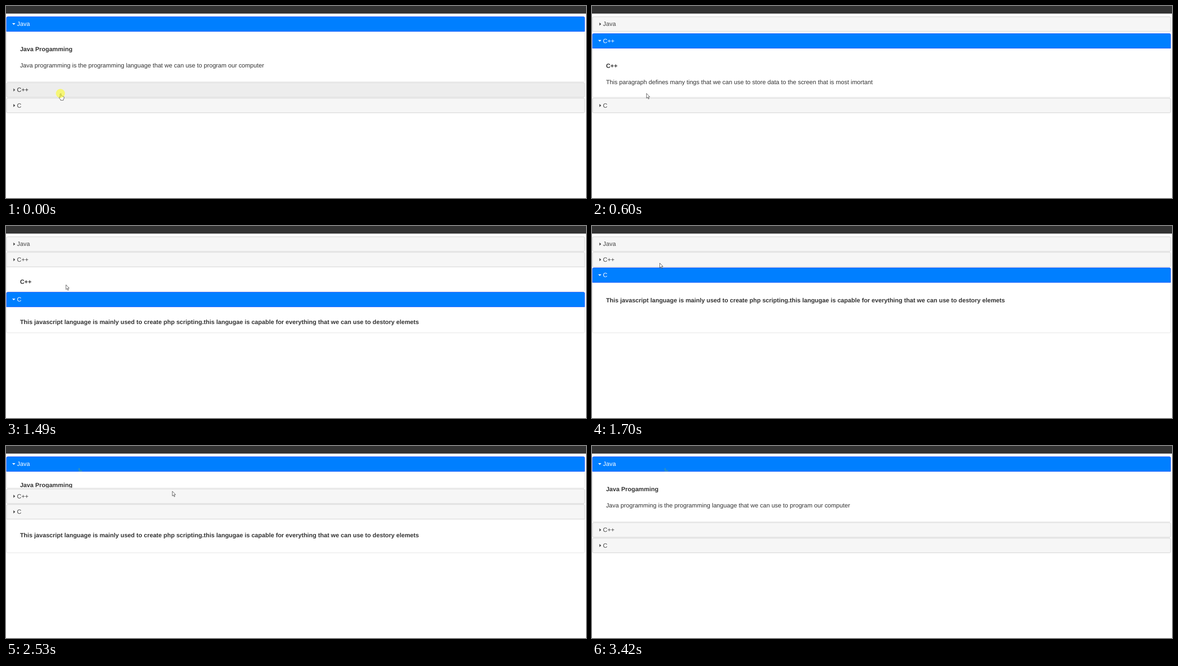
Animation, 1280 px wide and 425 px high, one loop 3480 ms. Source, as an HTML page:

```html
<!DOCTYPE html>
<html lang="en">
<head>
<meta charset="utf-8">
<title>Accordion</title>
<style>
  html, body { margin: 0; width: 100%; height: 100%; overflow: hidden; background: #fff; }
  svg { display: block; }
  text { font: 13.44px "Liberation Sans", Arial, sans-serif; text-rendering: geometricPrecision; }
  .bold { font-weight: bold; }
</style>
</head>
<body>
<svg id="stage" width="1280" height="425" viewBox="0 0 1280 425">
  <rect width="1280" height="16.8" fill="#333"/>
</svg>
<script>
const LOOP = 3480, SLIDE = 400, STEP = 70;
const LEFT = 1.2, RIGHT = 1277, TOP = 23.8, HEAD = 32.4, GAP = 2, BODY = 111.4, PAD = 13.44, R = 2.5;

const SECTIONS = [
  { title: "Java", head: "Java Progamming",
    para: "Java programming is the programming language that we can use to program our computer" },
  { title: "C++", head: "C++",
    para: "This paragraph defines many tings that we can use to store data to the screen that is most imortant" },
  { title: "C", head: "This javascript language is mainly used to create php scripting.this langugae is capable for everything that we can use to destory elemets",
    para: "" }
];

// the pointer enters a header, presses, and leaves; a press with a slide opens the section
const VISITS = [
  { row: 1, enter: 0, press: 0, leave: 250, slide: 241 },
  { row: 2, enter: 810, press: 1080, leave: 1280, slide: 1286 },
  { row: 0, enter: 1760, press: 2320, leave: 2390, slide: 2374 },
  { row: 2, enter: 2880, press: 3080, leave: 3080 }
];

// pointer moves between resting points
const HOME = { x: 120.3, y: 193.5 };
const MOVES = [
  { from: 670, to: 810, x: 122.3, y: 215.5 },
  { from: 1280, to: 1490, x: 132.3, y: 130 },
  { from: 1490, to: 1840, x: 161, y: 50 },
  { from: 2390, to: 2740, x: 676.3, y: 175.3 },
  { from: 2740, to: 2810, x: 762, y: 214 },
  { from: 3080, to: 3220, x: 1173, y: 374 }
];

const clamp = p => Math.min(1, Math.max(0, p));
const swing = p => 0.5 - Math.cos(Math.PI * clamp(p)) / 2;
const during = (t, from, to) => t >= from && t < to;
const past = t => VISITS.filter(v => v.leave <= t);

const stage = document.getElementById("stage");
function set(el, attrs) {
  for (const k in attrs) el.setAttribute(k, attrs[k]);
  return el;
}
function add(parent, tag, attrs = {}, label) {
  const el = set(document.createElementNS("http://www.w3.org/2000/svg", tag), attrs);
  if (label) el.textContent = label;
  return parent.appendChild(el);
}
const show = (el, on) => set(el, { display: on ? "inline" : "none" });

const rows = SECTIONS.map((s, i) => {
  const clip = add(add(stage, "clipPath", { id: "clip" + i }), "rect", { width: 1280 });
  const panel = add(stage, "g");
  const frame = add(panel, "path", { fill: "#fff", stroke: "#ddd", "stroke-width": 0.84 });
  const copy = add(panel, "g", { "clip-path": `url(#clip${i})`, fill: "#333" });
  const head = add(copy, "text", { x: 30.9, class: "bold" }, s.head);
  const para = add(copy, "text", { x: 30.9 }, s.para);
  const bar = add(stage, "g");
  const box = add(bar, "path", { "stroke-width": 0.84 });
  const icon = add(bar, "path");
  const title = add(bar, "text", { x: 24.3, y: 20.5 }, s.title);
  return { clip, panel, frame, head, para, bar, box, icon, title };
});

// smudge the hand leaves on the reopened header
const smudge = add(stage, "path", { d: "M160 49h3v3.6l5 1.2v2.2h-8z", fill: "#2a8fc4" });

const pointer = add(stage, "g", { fill: "#fff", stroke: "#333", "stroke-width": 0.85, "stroke-linejoin": "round" });
const arrow = add(pointer, "path", { d: "M0 0V10.6L2.4 8.3L4.1 12.3L5.7 11.6L4 7.7H7.2Z" });
const hand = add(pointer, "path", {
  transform: "translate(.4 .8)",
  d: "M-1.2 .6Q0-1.8 1.2.6V5Q3.3 4 3.7 5.5Q5.4 4.7 5.7 6.3Q7.4 6 7.4 7.7L7.2 10.4L5.9 13V14.4H-.3V13L-3.2 9.5Q-4.4 7.6-3.1 7.2Q-2 7.2-1.2 8.7Z"
});
const glow = add(stage, "circle", { r: 10, fill: "#ff0", opacity: 0.5 });

// motion is sampled in even steps, counted from the last press
function sample(t) {
  const last = past(t).pop();
  const base = last ? last.leave : 0;
  return base + Math.floor((t - base) / STEP) * STEP;
}

function heights(t) {
  const h = [BODY, 0, 0];
  let open = 0;
  for (const v of VISITS) {
    if (!(t >= v.slide)) continue;
    const p = swing((t - v.slide) / SLIDE);
    h[open] = BODY * (1 - p);
    h[v.row] = BODY * p;
    open = v.row;
  }
  return h;
}

function pointerAt(t) {
  return MOVES.reduce((at, m) => {
    const p = clamp((t - m.from) / (m.to - m.from));
    return { x: at.x + (m.x - at.x) * p, y: at.y + (m.y - at.y) * p };
  }, HOME);
}

function barShape(r) {
  return `M${LEFT} ${R}q0-${R} ${R}-${R}H${RIGHT - R}q${R} 0 ${R} ${R}V${HEAD - r}q0 ${r}-${r} ${r}H${LEFT + r}q-${r} 0-${r}-${r}Z`;
}

function drawRow(row, y, h, active, hover) {
  const bottom = y + HEAD, end = bottom + h;
  const shift = PAD * (h / BODY - 1);
  const [fill, line, ink, mark] = active ? ["#007fff", "#003eff", "#fff", "#fff"]
    : hover ? ["#ededed", "#ccc", "#2b2b2b", "#555"] : ["#f6f6f6", "#c5c5c5", "#454545", "#444"];
  show(row.panel, h > 3);
  set(row.frame, { d: `M${LEFT} ${bottom}V${end - R}q0 ${R} ${R} ${R}H${RIGHT - R}q${R} 0 ${R}-${R}V${bottom}` });
  set(row.clip, { y: bottom, height: Math.max(0, h - 0.6) });
  set(row.head, { y: bottom + 44.2 + shift });
  set(row.para, { y: bottom + 79.9 + shift });
  set(row.bar, { transform: `translate(0 ${y})` });
  set(row.box, { d: barShape(h > 0 ? 0 : R), fill, stroke: line });
  set(row.icon, { d: active ? "M13.6 14.3h7l-3.5 3.6z" : "M16.4 12.7l3.8 3.5l-3.8 3.5z", fill: mark });
  set(row.title, { fill: ink });
}

function draw(t) {
  const moved = sample(t);
  const h = heights(moved);
  const opened = past(t).filter(v => v.slide).pop();
  const open = opened ? opened.row : 0;
  const visit = VISITS.find(v => during(t, v.enter, v.leave));

  let y = TOP;
  rows.forEach((row, i) => {
    drawRow(row, y, h[i], i === open, visit && visit.row === i);
    y += HEAD + GAP + h[i];
  });

  const at = pointerAt(moved);
  const isHand = VISITS.some(v => during(t, v.enter, v.leave + STEP));
  set(pointer, { transform: `translate(${at.x} ${at.y})` });
  show(pointer, t < LOOP - 60);
  show(hand, isHand);
  show(arrow, !isHand);
  set(glow, { cx: at.x - 0.2, cy: at.y });
  show(glow, visit && t >= visit.press);
  show(smudge, opened && opened.row === 0);
}

const origin = performance.now();
function tick() {
  draw((performance.now() - origin) % LOOP);
  requestAnimationFrame(tick);
}
draw(0);
requestAnimationFrame(tick);
</script>
</body>
</html>
```
